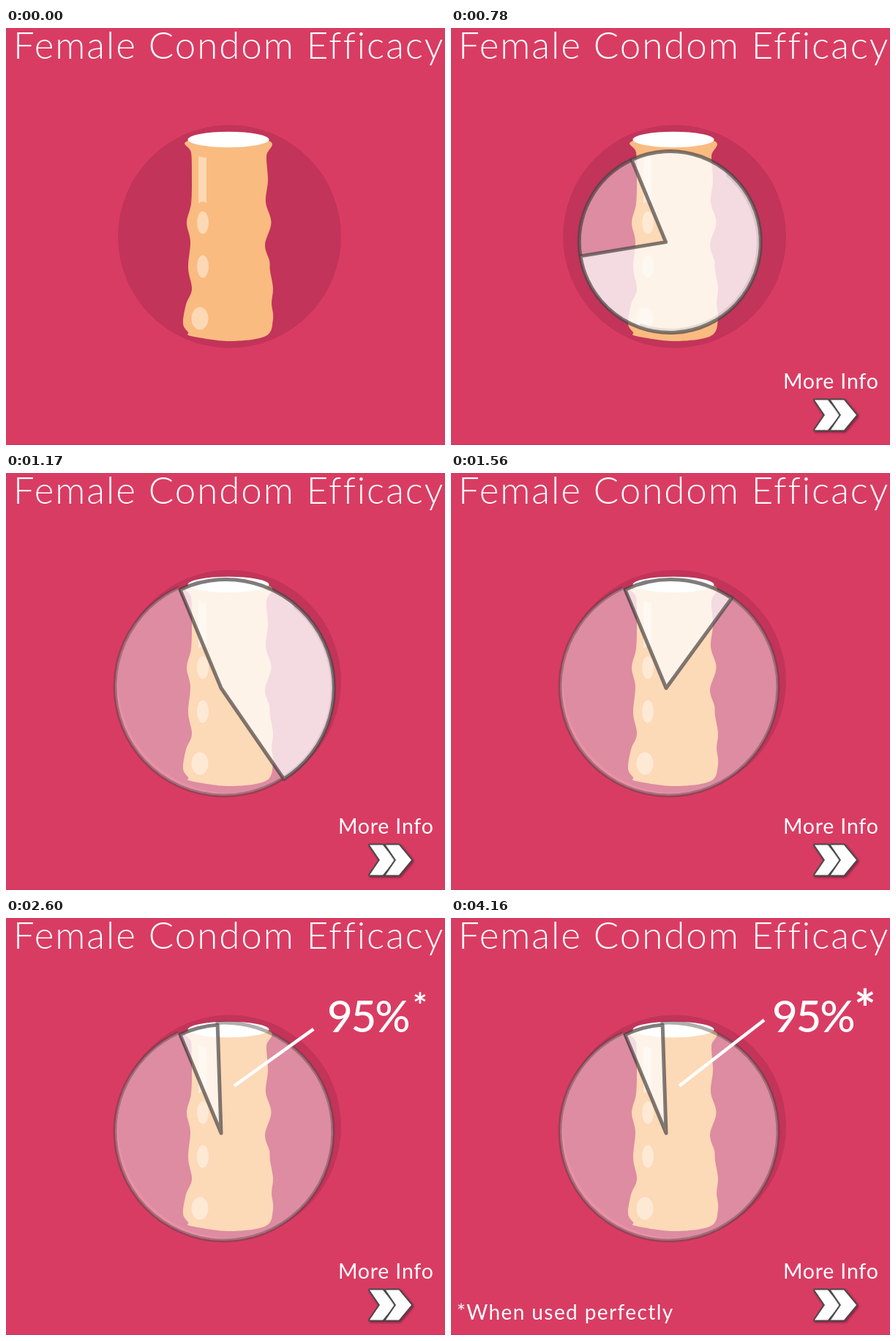
An HTML page with a canvas that plays this animation: 600 px wide and 570 px high, repeating every 6.89 s.

```html
<!DOCTYPE html>
<html lang="en">
<head>
<meta charset="utf-8">
<title>Female Condom Efficacy</title>
<style>
html, body { margin: 0; width: 100%; height: 100%; overflow: hidden; background: #d93c63; }
canvas { display: block; }
</style>
</head>
<body>
<canvas id="stage" width="600" height="570"></canvas>
<script>
const ctx = document.getElementById('stage').getContext('2d');
const LOOP = 6890, STEP = 130, LAST = 32;
const INK = '74,69,69';
const clamp = (v, lo = 0, hi = 1) => Math.min(hi, Math.max(lo, v));
const mix = (a, b, t) => a + (b - a) * t;
const rad = deg => deg * Math.PI / 180;

// Outline of the body, clockwise from the left of the rim
const BODY = [
  [247, 155], [304, 143], [361, 155], [356, 175], [358, 208], [355, 238], [362.5, 266],
  [354, 296], [360, 318], [361, 332], [365, 356], [363, 376], [365, 398], [355, 421],
  [305, 428], [253, 421], [249, 416], [242, 404], [246, 378], [254, 357], [249, 328],
  [252, 292], [247, 266], [253, 240], [254, 205], [253, 170]
];

function smooth(points) {
  const n = points.length, at = i => points[(i + n) % n];
  ctx.beginPath();
  ctx.moveTo(...points[0]);
  for (let i = 0; i < n; i++) {
    const [a, b, c, d] = [at(i - 1), at(i), at(i + 1), at(i + 2)];
    ctx.bezierCurveTo(
      b[0] + (c[0] - a[0]) / 6, b[1] + (c[1] - a[1]) / 6,
      c[0] - (d[0] - b[0]) / 6, c[1] - (d[1] - b[1]) / 6, c[0], c[1]);
  }
  ctx.closePath();
}

function ellipse(x, y, rx, ry, color) {
  ctx.beginPath();
  ctx.ellipse(x, y, rx, ry, 0, 0, 2 * Math.PI);
  ctx.fillStyle = color;
  ctx.fill();
}

// Text with its ink starting at x
function label(text, x, y, size, weight, spacing = 0) {
  ctx.font = `${weight} ${size}px Lato, "Open Sans", sans-serif`;
  ctx.letterSpacing = spacing + 'px';
  ctx.fillStyle = '#fff';
  ctx.fillText(text, x + ctx.measureText(text).actualBoundingBoxLeft, y);
}

function scaled(x, y, s, draw) {
  if (s <= 0) return;
  ctx.save();
  ctx.translate(x, y);
  ctx.scale(s, s);
  ctx.translate(-x, -y);
  draw();
  ctx.restore();
}

function background() {
  ctx.fillStyle = '#d93c63';
  ctx.fillRect(0, 0, 600, 570);
  ctx.fillStyle = '#c8385d';
  ctx.fillRect(0, 569, 600, 1);
  ellipse(305.5, 285, 152.5, 152.5, '#c23459');
  label('Female Condom Efficacy', 15, 42, 51, 300, 2);
}

function product() {
  const shine = '#fcd8b5';
  smooth(BODY);
  ctx.fillStyle = '#f9bb80';
  ctx.fill();
  ellipse(304, 152.5, 55.5, 10.7, '#fff');
  ctx.beginPath();
  ctx.moveTo(263, 175);
  ctx.quadraticCurveTo(268, 177, 274, 177);
  ctx.lineTo(274, 239);
  ctx.quadraticCurveTo(268, 235, 263, 240);
  ctx.fillStyle = shine;
  ctx.fill();
  ellipse(269, 266, 8, 15.5, shine);
  ellipse(269, 326, 8, 15.5, shine);
  ellipse(265, 397, 11.5, 15.5, shine);
}

function pie(k) {
  const r = clamp(46 + 39 * (k - 4), 0, 149);
  if (!r) return;
  const g = r / 149, cx = 293.5 + 7 * g, cy = 287.5 + 6 * g;
  const ax = 291.5 + 2.5 * g, ay = 286 + 8 * g;
  const sweep = k < 6 ? Math.max(2, 22 + 26 * (k - 4)) : Math.min(339.4, 74 + 37.8 * (k - 6));
  const start = rad(245), edge = rad(245 - sweep), full = start + 2 * Math.PI;
  const shift = g < 1 ? 0 : 1;
  const slice = (x, y, radius, from, to) => {
    ctx.beginPath();
    ctx.moveTo(ax, ay);
    ctx.arc(x, y, radius, from, to);
    ctx.closePath();
  };
  ctx.lineJoin = 'round';
  ctx.lineWidth = 5;

  // Covered share
  const px = cx - 2.5 * shift, py = cy - 1.5 * shift;
  slice(px, py, r, edge, start);
  ctx.fillStyle = 'rgba(255,255,255,.43)';
  ctx.fill();
  ctx.beginPath();
  ctx.arc(px, py, r, edge, start);
  ctx.strokeStyle = `rgba(${INK},${shift ? .43 : .7})`;
  ctx.stroke();

  // Remaining share
  slice(cx, cy, r - shift, start, edge + 2 * Math.PI);
  ctx.fillStyle = 'rgba(255,255,255,.82)';
  ctx.fill();
  ctx.save();
  ctx.clip();
  ctx.beginPath();
  ctx.arc(cx, cy, r - 4, full - rad(310 - 5), full - rad(130));
  ctx.arc(cx, cy, r - 4, rad(-50), rad(110));
  ctx.restore();
  ctx.save();
  slice(cx, cy, r - shift, start, edge + 2 * Math.PI);
  ctx.clip();
  ctx.beginPath();
  ctx.arc(cx, cy, Math.max(0, r - 4), rad(-50), rad(110));
  ctx.lineWidth = 3;
  ctx.strokeStyle = `rgba(${INK},.13)`;
  ctx.stroke();
  ctx.restore();
  slice(cx, cy, r - shift, start, edge + 2 * Math.PI);
  ctx.strokeStyle = `rgba(${INK},.7)`;
  ctx.stroke();
}

function chevron(x) {
  ctx.beginPath();
  [[0, 0], [18, 0], [35, 20.5], [18, 41], [0, 41], [14, 20.5]]
    .forEach(([dx, dy]) => ctx.lineTo(x + dx, 508.5 + dy));
  ctx.closePath();
  ctx.save();
  ctx.shadowColor = 'rgba(40,10,20,.5)';
  ctx.shadowBlur = 3;
  ctx.shadowOffsetX = ctx.shadowOffsetY = 1.5;
  ctx.lineWidth = 4;
  ctx.lineJoin = 'round';
  ctx.strokeStyle = '#4d4a4b';
  ctx.stroke();
  ctx.restore();
  ctx.fillStyle = '#fff';
  ctx.fill();
}

function moreInfo(k) {
  const s = [0, .45, .9, 1.05, .95][k] ?? 1;
  scaled(455, 494, s, () => label('More Info', 456, 493, 28.5, 400, .8));
  scaled(526, 530, s, () => {
    chevron(497);
    chevron(519);
  });
}

function pointer(k) {
  const grow = clamp((k - 14) / 4);
  if (!grow) return;
  const settle = clamp((k - 18) / (LAST - 18));
  const x = mix(419, 428, settle), y = mix(154, 139.5, settle);
  ctx.beginPath();
  ctx.moveTo(312, 229.5);
  ctx.lineTo(mix(312, x, grow), mix(229.5, y, grow));
  ctx.lineWidth = mix(.5, 4.6, grow);
  ctx.strokeStyle = '#fff';
  ctx.stroke();
}

function result(k) {
  scaled(495, 135, clamp((k - 15) / 3), () => label('95%', 441, 156, 60, 500, -2.2));
  scaled(566, 108, clamp((k - 18) / 3), () => {
    ctx.font = '700 70px Lato, "Open Sans", sans-serif';
    const top = ctx.measureText('*').actualBoundingBoxAscent;
    label('*', 554, 95 + top, 70, 700);
  });
  scaled(154, 540, clamp((k - 24) / 2), () => label('*When used perfectly', 9, 549, 28, 400, 1.4));
}

function frame(now) {
  const k = Math.min(LAST, Math.floor((now % LOOP) / STEP));
  background();
  product();
  pie(k);
  moreInfo(k);
  pointer(k);
  result(k);
}

const began = performance.now();
function tick() {
  frame(performance.now() - began);
  requestAnimationFrame(tick);
}
tick();
</script>
</body>
</html>
```
